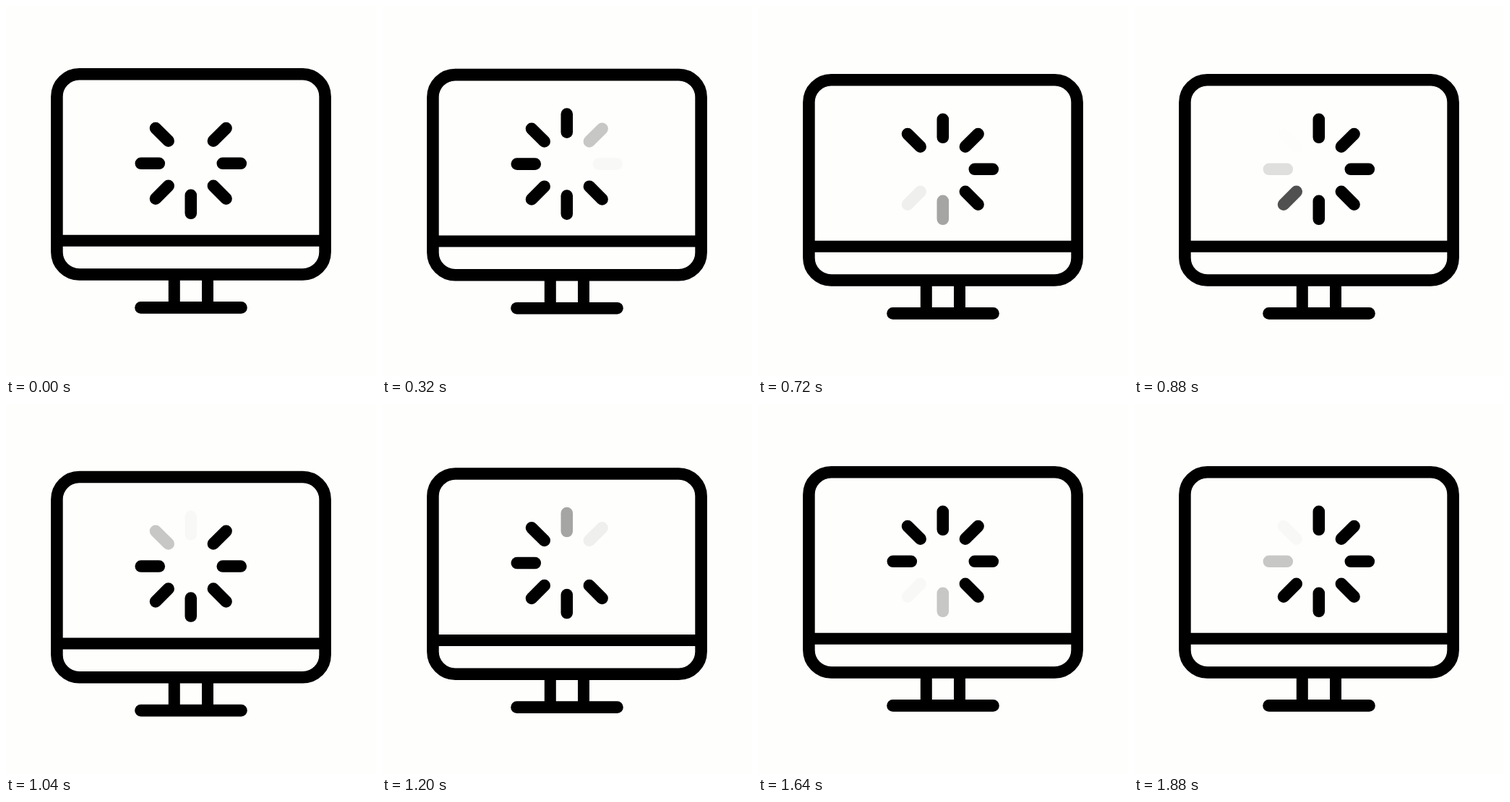
Animation, 512 px wide and 512 px high, one loop 1920 ms. Source, as an HTML page:

```html
<!DOCTYPE html>
<html lang="en">
<head>
<meta charset="utf-8">
<title>Loading monitor</title>
<style>
  html, body { margin: 0; width: 100%; height: 100%; overflow: hidden; background: #fefefc; }
  svg { display: block; width: 100%; height: 100%; }
</style>
</head>
<body>
<svg viewBox="0 0 512 512">
  <g id="monitor" fill="none" stroke="#000" stroke-width="16.6">
    <rect x="70.4" y="94.3" width="371.2" height="277.2" rx="31"/>
    <path d="M78 324.8H434M232.8 372V417M279 372V417" stroke-width="16"/>
    <path d="M186.5 417.4H325.5" stroke-linecap="round"/>
    <g id="spinner" transform="translate(255.8 217.8)" stroke-linecap="round"/>
  </g>
</svg>
<script>
const LOOP = 1920, FRAME = 40, STEP = 120, SPOKES = 8, DROP = 8;
const monitor = document.getElementById('monitor');
const spinner = document.getElementById('spinner');

const spokes = Array.from({ length: SPOKES }, (_, i) => {
  const spoke = document.createElementNS('http://www.w3.org/2000/svg', 'path');
  spoke.setAttribute('d', 'M0-44V-69');
  spoke.setAttribute('transform', `rotate(${i * 360 / SPOKES})`);
  return spinner.appendChild(spoke);
});

const clamp = v => Math.min(1, Math.max(0, v));

function ease(t, start, end) {
  const p = clamp((t - start) / (end - start));
  return p * p * (3 - 2 * p);
}

// A spoke vanishes at once, then returns slowly; age is counted in steps.
function opacity(age) {
  return clamp(age < 2 ? 0.06 * age ** 2.5 : age - 1.65);
}

function draw(t) {
  const y = DROP * (ease(t, 240, 650) - ease(t, 940, 1340));
  monitor.setAttribute('transform', `translate(0 ${y.toFixed(2)})`);
  spokes.forEach((spoke, i) => {
    const age = t / STEP - i;
    spoke.setAttribute('opacity', age < 0 ? 1 : opacity(age % SPOKES));
  });
}

const start = performance.now();
function tick() {
  const t = (performance.now() - start) % LOOP;
  draw(Math.floor(t / FRAME) * FRAME);
  requestAnimationFrame(tick);
}
tick();
</script>
</body>
</html>
```
